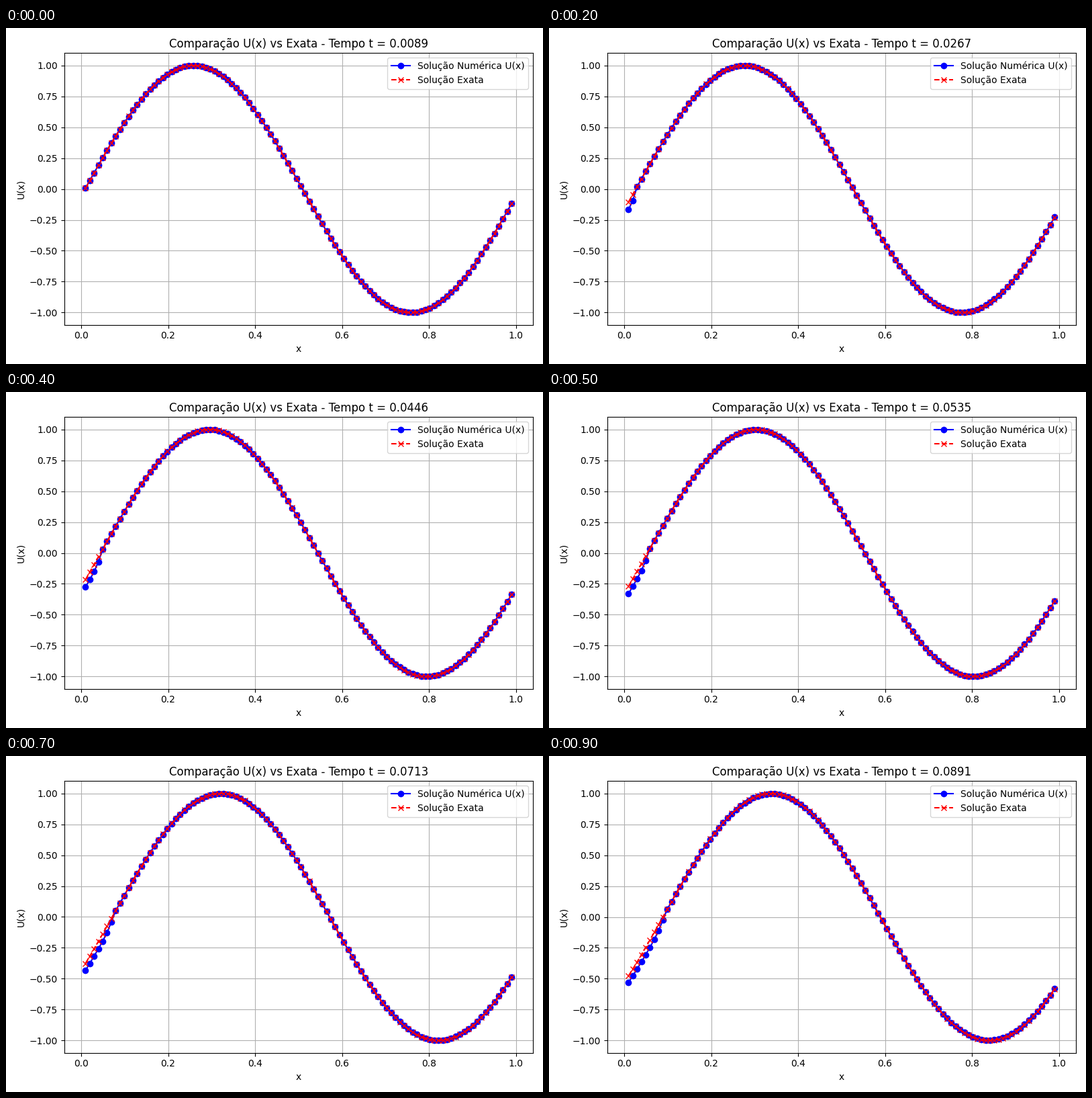
A matplotlib script for the animation above (1 s loop, 800 by 500 pixels).

```python
import numpy as np
import matplotlib.pyplot as plt
from matplotlib.animation import FuncAnimation

CELLS = 101
STEPS = 10
COURANT = 0.9
DX = 1 / CELLS
DT = COURANT * DX

x = np.linspace(0, 1, CELLS + 1)
inner = slice(1, CELLS)


def exact(t):
    return np.sin(2 * np.pi * (x - t))


def upwind(steps):
    """Advect the sine wave, feeding the last inner node back into the inlet."""
    u = exact(0)
    for _ in range(steps):
        u[inner] -= COURANT * (u[inner] - u[:CELLS - 1])
        u[0] = u[CELLS - 1]
    return u


fig, ax = plt.subplots(figsize=(8, 5), dpi=100)


def draw(frame):
    step = frame + 1
    t = step * DT
    ax.clear()
    ax.plot(x[inner], upwind(step)[inner], "bo-", label="Solução Numérica U(x)")
    ax.plot(x[inner], exact(t)[inner], "rx--", label="Solução Exata")
    ax.set_title(f"Comparação U(x) vs Exata - Tempo t = {t:.4f}")
    ax.set_xlabel("x")
    ax.set_ylabel("U(x)")
    ax.legend(loc="upper right")
    ax.grid(True)


draw(0)
fig.tight_layout()
anim = FuncAnimation(fig, draw, frames=STEPS, init_func=lambda: draw(0),
                     interval=100, repeat=True, repeat_delay=0)
plt.show()
```
